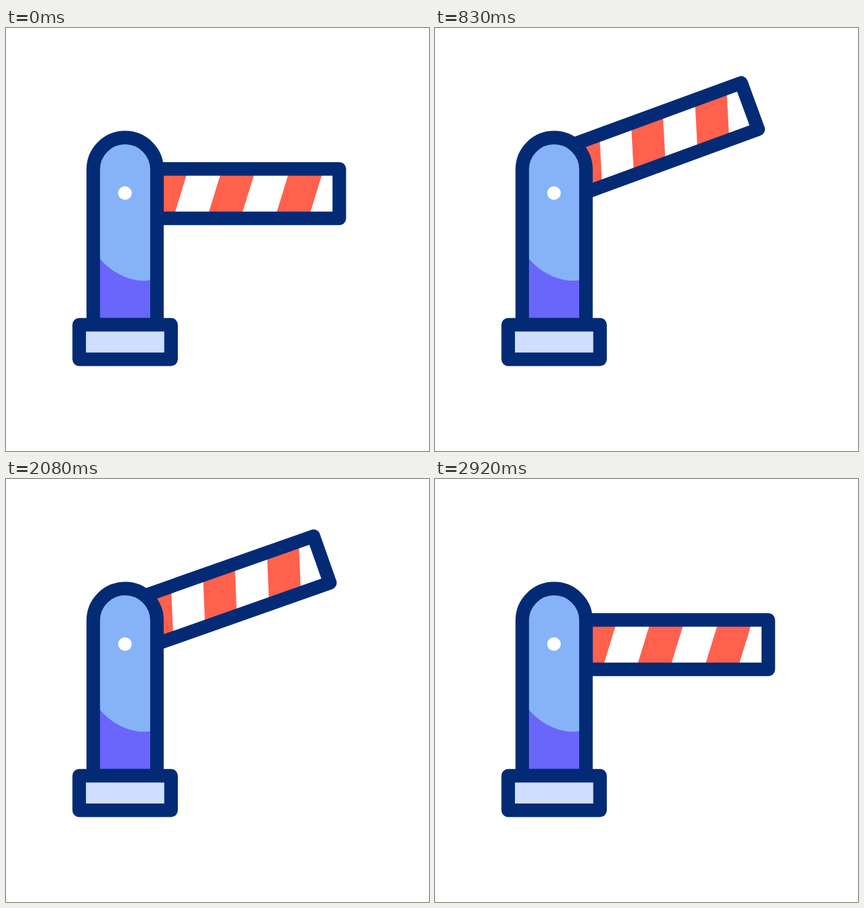
These frames come from a looping animation (640 px wide and 640 px high, 3 s). An HTML page:

```html
<!DOCTYPE html>
<html lang="en">
<head>
<meta charset="utf-8">
<title>Barrier gate</title>
<style>
  html, body { margin: 0; width: 100%; height: 100%; overflow: hidden; background: #fff; }
  svg { display: block; width: 100%; height: 100%; }
  .line { stroke: #032b75; stroke-width: 20.5; stroke-linejoin: round; }
</style>
</head>
<body>
<svg viewBox="0 0 640 640">
  <g id="arm">
    <path fill="#fff" d="M228 213.2H504.3V288H228Z"/>
    <path fill="#ff614d" d="M225 213.2h51l-23 74.8h-51ZM327 213.2h51l-23 74.8h-51ZM429.7 213.2h51l-23 74.8h-51Z"/>
    <path class="line" fill="none" d="M228 213.2H504.3V288H228Z"/>
  </g>
  <path fill="#86b3f7" d="M132 449V214a48.2 48.2 0 0 1 96.4 0V449Z"/>
  <path fill="#6b66fb" d="M132 336L142 349C158 368 184 382.3 208 382.3Q213 382.3 218 381.4L228 379V449H132Z"/>
  <path class="line" fill="none" d="M132 449V214a48.2 48.2 0 0 1 96.4 0V449Z"/>
  <path class="line" fill="#cfddff" d="M110.7 448.9H249.7V501.2H110.7Z"/>
  <circle cx="180" cy="249.8" r="10.3" fill="#fff"/>
</svg>
<script>
  const LOOP = 3000, FPS = 24;
  const PIVOT = '169.5 267.4';
  const LIFT = { x: -2.6, y: -24 };
  const TILT = 30;
  const arm = document.getElementById('arm');

  const ramp = (v, from, to) => Math.min(1, Math.max(0, (v - from) / (to - from)));
  const stepStart = k => 10 * Math.round(k * 100 / FPS);

  // Steps run at 24 per second, with starts rounded to 10 ms.
  function stepAt(ms) {
    const k = Math.floor((ms + 5) * FPS / 1000);
    return stepStart(k) > ms ? k - 1 : k;
  }

  // The arm lifts before it tilts, and levels out before it settles.
  function pose(ms) {
    const k = stepAt(ms);
    const lift = ramp(k, 1, 26) - ramp(k, 44, 70);
    const tilt = ramp(k, 7.75, 26) - ramp(k, 44, 61);
    arm.setAttribute('transform',
      `translate(${LIFT.x * lift} ${LIFT.y * lift}) rotate(${-TILT * tilt} ${PIVOT})`);
  }

  const start = performance.now();
  function tick() {
    pose((performance.now() - start) % LOOP);
    requestAnimationFrame(tick);
  }
  tick();
</script>
</body>
</html>
```
